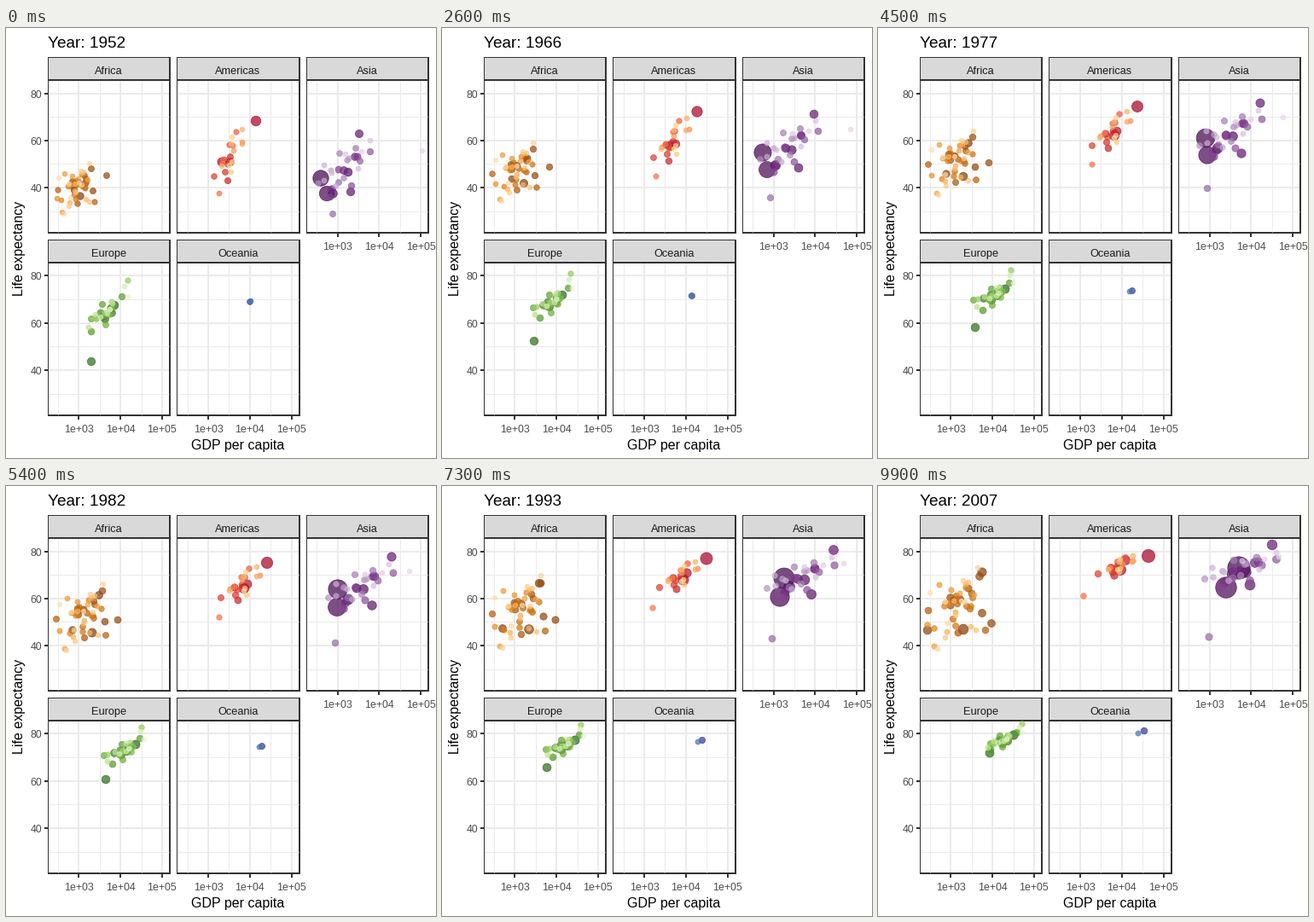
Animation, 504 px wide and 504 px high, one loop 10000 ms. Source, as a matplotlib script:

```python
import numpy as np
import matplotlib.pyplot as plt
from matplotlib.animation import FuncAnimation
from matplotlib.colors import LinearSegmentedColormap
from matplotlib.patches import Rectangle

SIZE, FRAMES, STEP = 504, 100, 100
START, END = 1952, 2007
DARK, LABEL, GRID = "#333333", "#4d4d4d", "#ebebeb"

plt.rcParams["font.family"] = "Liberation Sans"
rng = np.random.default_rng(11)


def px(log_income, col):
    return 85.4 + 151.65 * col + 48.75 * (log_income - 3)


def py(life, row):
    return 76.55 + 213.9 * row + 2.762 * (80 - life)


fig = plt.figure(figsize=(SIZE / 72, SIZE / 72), dpi=72, facecolor="white")
ax = fig.add_axes([0, 0, 1, 1])
ax.set(xlim=(0, SIZE), ylim=(SIZE, 0))
ax.axis("off")


def line(x, y, color, width, z):
    ax.plot(x, y, color=color, lw=width, zorder=z, solid_capstyle="butt")


def fill(x0, y0, x1, y1, color, z):
    ax.add_patch(Rectangle((x0, y0), x1 - x0, y1 - y0, fc=color, lw=0,
                           antialiased=False, zorder=z))


def box(x0, y0, x1, y1, color):
    """Frame with a thin left and top edge, a thicker right and bottom."""
    fill(x0, y0, x1, y1, DARK, 0)
    fill(x0 + 1, y0 + 1, x1 - 2, y1 - 2, color, 0.5)


def write(x, y, s, size=12.8, color="black", ha="center", **kw):
    return ax.text(x, y, s, fontsize=size, color=color, ha=ha,
                   va="baseline", **kw)


def draw_panel(name, col, row):
    x0, x1 = (np.floor(x + 151.57 * col) for x in (49.3, 193.8))
    y0, y1 = 61 + 214 * row, 241 + 214 * row
    box(x0, y0 - 27, x1, y0 + 1, "#d9d9d9")
    box(x0, y0, x1, y1, "white")
    for width, shift in ((1, -0.5), (2, 0)):
        for g in (3, 4, 5):
            line([px(g + shift, col)] * 2, [y0 + 1, y1 - 2], GRID, width, 1)
        for v in (40, 60, 80):
            y = py(v + 20 * shift, row)
            line([x0 + 1, x1 - 2], [y, y], GRID, width, 1)
    write((x0 + x1) / 2 - 0.5, y0 - 7, name, color="#1a1a1a")
    if col == 0:
        for v in (40, 60, 80):
            line([x0 - 4, x0], [py(v, row)] * 2, DARK, 2, 3)
            write(x0 - 7, py(v, row) + 5, str(v), 12.4, LABEL, "right")
    if row == 1 or col == 2:
        for g in (3, 4, 5):
            line([px(g, col)] * 2, [y1, y1 + 4], DARK, 2, 3)
            write(px(g, col), y1 + 19.5, f"1e+0{g}", 12.4, LABEL)


def crowd(n, top, bow, link, start, end):
    """Dots that keep their relative place in a drifting, widening cloud.

    start and end hold the mean and the spread of log income and life.
    """
    a = np.clip(rng.normal(size=n), -1.9, 1.9)
    b = np.clip(rng.normal(size=n), -1.9, 1.9)
    b = link * a + np.sqrt(1 - link ** 2) * b
    people = top * np.exp(-4 * np.arange(n) / n)
    ends = [m + s * z for m, s, z in
            (start[:3], start[3:], end[:3], end[3:])] if False else None
    (g0, sg0, l0, sl0), (g1, sg1, l1, sl1) = start, end
    return np.column_stack([people, g0 + sg0 * a, l0 + sl0 * b,
                            g1 + sg1 * a, l1 + sl1 * b,
                            rng.normal(bow, 0.06, n)])


# Lead dots: people (millions), log income and life at the start, the same
# at the end, and how far the income path bows out on the way.
AFRICA = [(135, 3.03, 36.3, 3.30, 46.9, .15), (80, 3.15, 41.9, 3.75, 71.3, 0),
          (65, 2.89, 39.1, 2.44, 46.5, .2), (44, 3.67, 45, 3.97, 49.3, .1)]
AMERICAS = [(301, 4.15, 68.4, 4.63, 78.2, 0), (190, 3.32, 50.9, 3.96, 72.4, .2),
            (109, 3.54, 50.8, 4.08, 76.2, .1), (8, 3.26, 37.6, 3.08, 60.9, .1)]
ASIA = [(1319, 2.60, 44, 3.70, 73, -.2), (1110, 2.74, 37.4, 3.39, 64.7, -.1),
        (223, 2.88, 37.5, 3.55, 70.6, 0), (127, 3.51, 63, 4.50, 82.6, .25),
        (32, 2.89, 28.8, 2.99, 43.8, 0), (2, 5.03, 55.6, 4.67, 77.6, -.1)]
EUROPE = [(82, 3.85, 67.5, 4.51, 79.4, .15), (71, 3.29, 43.6, 3.93, 71.8, 0)]
OCEANIA = [(20, 4.0, 69.1, 4.54, 81.2, 0), (4, 4.02, 69.4, 4.40, 80.2, 0)]

AFRICA = np.vstack([AFRICA, crowd(
    48, 50, .05, .35, (2.98, .26, 39.5, 5), (3.2, .4, 55.5, 8))])
AMERICAS = np.vstack([AMERICAS, crowd(
    21, 44, .08, .6, (3.48, .18, 53, 8), (3.85, .22, 73.5, 3))])
ASIA = np.vstack([ASIA, crowd(
    27, 160, .06, .7, (3.2, .35, 47, 8), (3.8, .48, 71.5, 5))])
EUROPE = np.vstack([EUROPE, crowd(
    28, 61, .1, .85, (3.7, .25, 65, 5), (4.3, .22, 77.5, 2.5))])

# name, column, row, dots, growth of population, bow of life, colours
PANELS = [
    ("Africa", 0, 0, AFRICA, 3.7, 3.5,
     ["#7f3b08", "#b35806", "#e08214", "#fdb863", "#fee0b6"]),
    ("Americas", 1, 0, AMERICAS, 2.4, 1.5,
     ["#a50026", "#d73027", "#f46d43", "#fdae61", "#fee090"]),
    ("Asia", 2, 0, ASIA, 2.5, 4,
     ["#40004b", "#762a83", "#9970ab", "#c2a5cf", "#e7d4e8"]),
    ("Europe", 0, 1, EUROPE, 1.25, 1.5,
     ["#276419", "#4d9221", "#7fbc41", "#b8e186", "#e6f5d0"]),
    ("Oceania", 1, 1, np.array(OCEANIA), 2.2, -1, ["#313695", "#4575b4"]),
]

groups, colors = [], []
for name, col, row, dots, growth, bow, stops in PANELS:
    draw_panel(name, col, row)
    n = len(dots)
    dots = dots[np.argsort(-dots[:, 0])]
    groups.append(np.column_stack(
        [dots, np.tile([col, row, growth, bow], (n, 1))]))
    cmap = LinearSegmentedColormap.from_list(name, stops)
    colors.append(cmap(np.linspace(0, 1, n), alpha=0.7))

(people, g0, life0, g1, life1, g_bow,
 cols, rows, growth, life_bow) = np.vstack(groups).T
colors = np.vstack(colors)

title = write(49, 23, "", 19, ha="left")
write(272, 494, "GDP per capita", 16)
write(20.5, 258.5, "Life expectancy", 16, rotation=90,
      rotation_mode="anchor")
cloud = ax.scatter(px(g0, cols), py(life0, rows), linewidths=0.8, zorder=3)
cloud.set(facecolor=colors, edgecolor=colors)


def draw(i):
    t = i / (FRAMES - 1)
    arc = 4 * t * (1 - t)
    x = px(g0 + (g1 - g0) * t + g_bow * arc, cols)
    y = py(life0 + (life1 - life0) * t + life_bow * arc, rows)
    cloud.set_offsets(np.round(np.column_stack([x, y])))

    now = people * growth ** (t - 1)
    radius = 0.354 + 1.067 * (2 + 10 * np.sqrt(now / 1319))
    cloud.set_sizes((2 * radius) ** 2)
    title.set_text(f"Year: {START + (END - START) * t:.0f}")
    return cloud, title


anim = FuncAnimation(fig, draw, frames=FRAMES, interval=STEP,
                     repeat=True, repeat_delay=0, blit=False)
plt.show()
```
